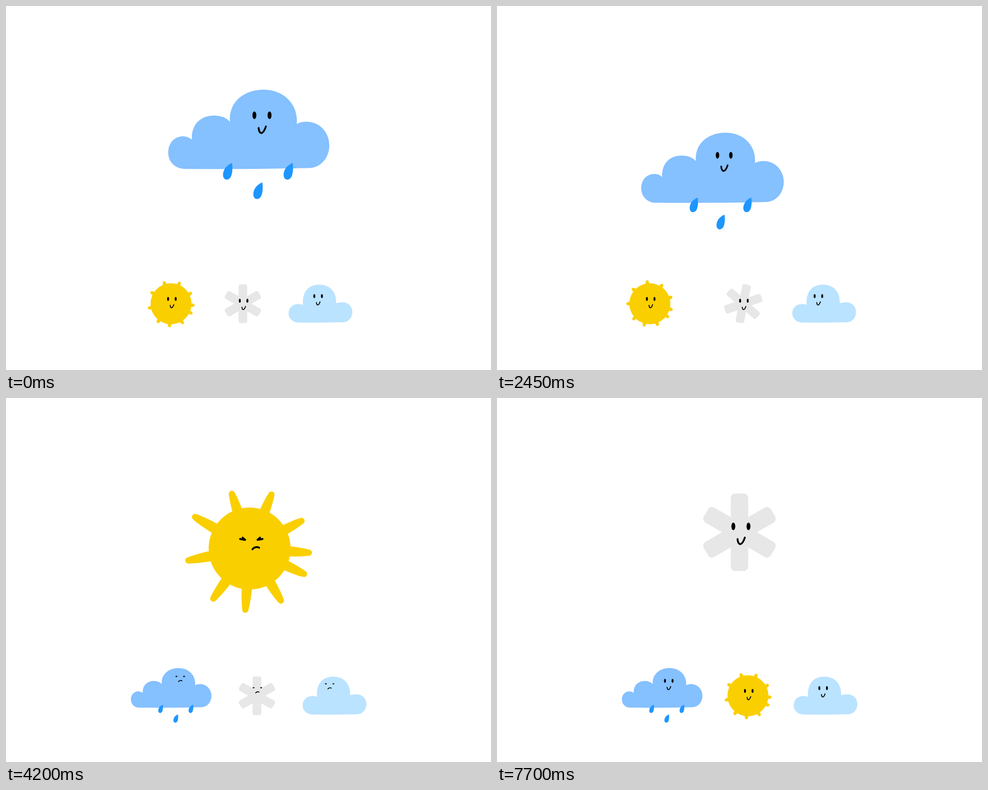
Recreate the animation shown at these times as an HTML page. Size 864 px wide and 648 px high, loop 8000 ms.

```html
<!DOCTYPE html>
<html lang="en">
<head>
<meta charset="utf-8">
<title>Weather friends</title>
<style>
html, body { margin: 0; width: 100%; height: 100%; overflow: hidden; background: #fff; }
svg { display: block; width: 100vw; height: 100vh; }
</style>
</head>
<body>
<svg id="stage" viewBox="0 0 864 648"></svg>
<script>
const LOOP = 8000, STEP = 350, LAST = 22;
const CENTER = 432, GAP = 48, MIDDLE_WIDTH = 66;
const stage = document.getElementById('stage');

const mix = (a, b, t) => a + (b - a) * t;
const ramp = (k, from, to) => Math.min(1, Math.max(0, (k - from) / (to - from)));
const wave = (k, from, to) => Math.sin(Math.PI * ramp(k, from, to));
const group = (transform, content) => `<g transform="${transform}">${content}</g>`;

// big: place when on stage, face: offset in big units, lift: 0 in the row, 1 on stage.
const cast = {
  rain: { width: 144, rowY: 516, big: [432, 219.5], face: [24, -25], settle: [6.4, 9],
    lift: k => 1 - ramp(k, 6.4, 9) },
  sun: { width: 94, rowY: 530, big: [434, 268], face: [3, -17], settle: [9, 10],
    lift: k => ramp(k, 8, 10) - ramp(k, 14.1, 16) },
  snow: { width: 66, rowY: 530, big: [432, 239], face: [2.5, -10.5], settle: [6.4, 9],
    lift: k => ramp(k, 15, 17) },
  cloud: { width: 114, rowY: 530, big: [432, 239], face: [-8, -27], settle: [6.4, 9],
    lift: () => 0 }
};

const acts = [
  { lead: 'rain', span: [0, 7], leadEye: 3.8, otherEye: 6.5 },
  { lead: 'sun', span: [10.4, 13.6], leadEye: 2, otherEye: 2.1 },
  { lead: 'snow', span: [17, 22], leadEye: 1.6, otherEye: 5 }
];
const restarts = [0, 10, 17, 22];

// Centres of the three resting characters, packed around the middle of the stage.
function layRow(lead) {
  const names = Object.keys(cast).filter(name => name !== lead);
  const widths = names.map((name, i) => i === 1 ? MIDDLE_WIDTH : cast[name].width);
  let left = CENTER - (widths.reduce((a, b) => a + b) + 2 * GAP) / 2;
  const row = {};
  names.forEach((name, i) => {
    row[name] = left + widths[i] / 2;
    left += widths[i] + GAP;
  });
  return row;
}
const rows = acts.map(act => layRow(act.lead));
const rowShift = rows[1].cloud - rows[0].cloud;

function place(name, k) {
  const { rowY, big, settle, lift } = cast[name];
  const up = lift(k);
  const next = rows[1][name] ?? rows[2][name];
  const slot = mix(rows[0][name] ?? next, next, ramp(k, ...settle));
  // The row makes room while the first lead comes down.
  const side = slot < 360 ? -2 : 1;
  const push = side * rowShift * wave(k, 6.5, 10) * (name === 'rain' ? up : 1 - up);
  return { x: mix(slot, big[0], up) + push, y: mix(rowY, big[1], up), scale: mix(.5, 1, up), small: up === 0 };
}

const RAIN_PATH = 'M319 290C302 290 289 278 289 261C289 243 301 232 315 232Q325 232 331 238' +
  'C330 210 347 195 371 195Q389 195 399 206C396 172 423 149 459 149C494 149 521 174 518 210' +
  'Q525 206 535 206C560 206 576 226 576 248C576 270 561 288 540 288.5Q430 291 319 290Z';
const DROP_PATH = 'M402.5 279.5C404 287 403.5 297 401 303C398 310 392 310 389 307.5' +
  'C384 302 387 290 395 284Q400 280 402.5 279.5Z';
const CLOUD_PATH = 'M520 563.5C509 563 502.5 556 502.5 547C502.5 537 510 530.5 520 530.5Q525 530.5 528 532' +
  'C526 509 538 496 557 496C577 496 588 510 587 529Q592 527.5 598 527.5C609 527.5 616 535 616 545' +
  'C616 555 609 562.5 600 563Q560 564 520 563.5Z';
const RAY_PATH = 'M-4 50Q-3 20 0 5.5Q3 20 4 50Z';

const drops = [[0, 0], [108, 0], [54, 34.5], [-54, 34.5], [0, 59], [98, 59], [143, 34.5]];
const rayAngles = [-18, 22, 62, 94, 115, 149, 184, 216, 259, 300];

const bodies = {
  rain({ small, mood, sway }) {
    const count = small ? 3 + sway : Math.round(mix(3, drops.length, mood));
    const falling = drops.slice(0, count).map(([x, y]) =>
      `<path fill="#1e96ff" d="${DROP_PATH}" transform="translate(${x} ${y})"/>`);
    return group('translate(-432 -219.5)', `<path fill="#85c0ff" d="${RAIN_PATH}"/>` + falling.join(''));
  },
  sun({ lead, mood, turn }) {
    const grow = lead ? mood ** 2 : 0;
    const rays = rayAngles.map((angle, i) => {
      const reach = mix(84, 108 + i * 1.1, grow);
      return `<path d="${RAY_PATH}" transform="rotate(${angle}) translate(0 ${-reach})"/>`;
    });
    return group(`rotate(${turn})`,
      `<g fill="#facf00" stroke="#facf00" stroke-width="11" stroke-linejoin="round">${rays.join('')}</g>` +
      '<circle r="73" fill="#facf00"/>');
  },
  snow({ turn }) {
    const arms = [0, 60, 120].map(angle =>
      `<rect x="-15.5" y="-69" width="31" height="138" rx="8" fill="#e7e7e7" transform="rotate(${angle})"/>`);
    return group(`rotate(${turn})`, arms.join(''));
  },
  cloud({ act, sway }) {
    const drift = 12 * sway / (act + 1);
    return group(`translate(${drift} 0) scale(2) translate(-559 -530)`,
      `<path fill="#bae3ff" d="${CLOUD_PATH}"/>`);
  }
};

function eyes(act, lead, mood) {
  if (lead === 'sun' && mood > .7) {
    return '<path d="M-20 0L-11 1.5M-15.5 -2.5L-11 1.5M20 0L11 1.5M15.5 -2.5L11 1.5" ' +
      'fill="none" stroke="#000" stroke-width="3.3" stroke-linecap="round"/>';
  }
  const ry = mix(6.8, lead ? acts[act].leadEye : acts[act].otherEye, mood);
  return [-13.5, 13.5].map(x => `<ellipse cx="${x}" rx="3.5" ry="${ry}"/>`).join('');
}

function mouth(lead, mood) {
  const happy = [[-6, 22.5], [-5, 35], [2, 35], [7, 20]];
  const upset = [[-6, 18.5], [-3, 13.5], [3, 14], [6, 15.5]];
  const aside = lead ? 8 : 0;
  const p = happy.map(([x, y], i) => [mix(x, upset[i][0] + aside, mood), mix(y, upset[i][1], mood)].join(' '));
  return `<path d="M${p[0]}C${p.slice(1).join(' ')}" fill="none" stroke="#000" ` +
    'stroke-width="3.2" stroke-linecap="round"/>';
}

// Resting characters look towards the one on stage.
function gaze(x, y, [toX, toY], amount) {
  const distance = Math.hypot(toX - x, toY - y) || 1;
  return [(toX - x) / distance * amount, (toY - y) / distance * amount];
}

function character(name, k) {
  const { x, y, scale, small } = place(name, k);
  const act = k < 9 ? 0 : k < 16 ? 1 : 2;
  const { lead: star, span } = acts[act];
  const lead = star === name && name;
  const mood = Math.min(1, 1.65 * wave(k, ...span) ** 2);
  const sway = (k - restarts.filter(step => step <= k).pop()) % 2;
  const turn = small ? 11 * sway : 0;
  const [lookX, lookY] = gaze(x, y, cast[star].big, lead ? 0 : 18 * mood);
  const [faceX, faceY] = cast[name].face;
  const face = group(`translate(${faceX + lookX} ${faceY + lookY})`, eyes(act, lead, mood) + mouth(lead, mood));
  return group(`translate(${x} ${y}) scale(${scale})`,
    bodies[name]({ act, lead, small, mood, sway, turn }) + face);
}

let shown = -1;
function update(now) {
  const k = Math.min(LAST, Math.floor(now % LOOP / STEP));
  if (k === shown) return;
  stage.innerHTML = Object.keys(cast).map(name => character(name, k)).join('');
  shown = k;
}

const start = performance.now();
function tick() {
  update(performance.now() - start);
  requestAnimationFrame(tick);
}
tick();
</script>
</body>
</html>
```
